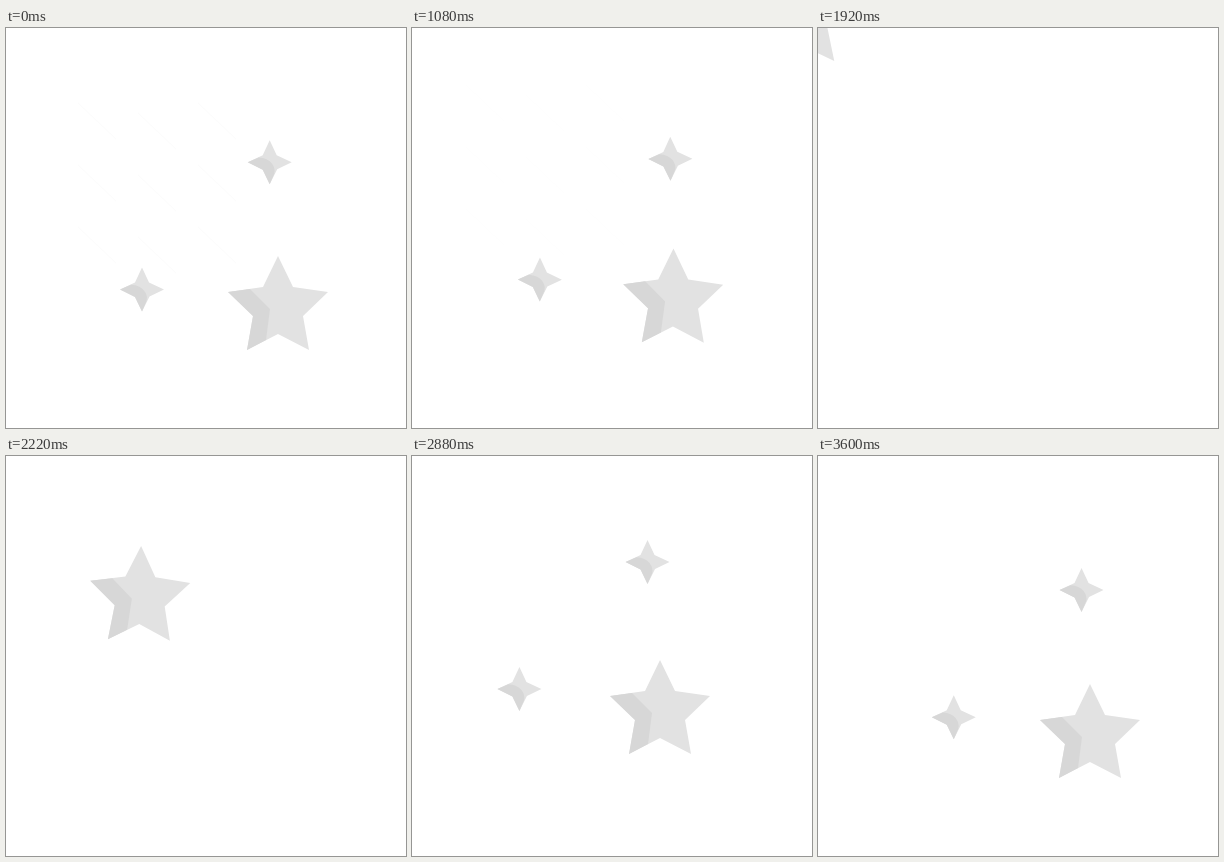
Recreate the animation shown at these times as an HTML page. Size 400x400 px, loop 5630 ms.

```html
<!DOCTYPE html>
<html lang="en">
<head>
<meta charset="utf-8">
<title>Shooting stars</title>
<style>
  html, body { margin: 0; width: 100%; height: 100%; overflow: hidden; background: #fff; }
  svg { display: block; width: 100%; height: 100%; }
  .light { fill: #e2e2e2; }
  .shade { fill: #d7d7d7; }
  #streaks { stroke: #fcfcfc; stroke-width: 1; }
</style>
</head>
<body>
<svg viewBox="0 0 400 400">
  <defs>
    <g id="spark">
      <path class="light" d="M0-22 7-7 22 0 7.5 7 0 22-7 7.5-22 0-7-7Z"/>
      <path class="shade" d="M-22 0-11-4.7Q-2-4 2 1T4.500 11.500L0 22-7 7.500Z"/>
    </g>
  </defs>
  <g id="streaks"></g>
  <g id="big">
    <path class="light" d="M0-49 15-18 50-13 25 11 31 45 0 29-31 45-25 11-50-13-15-18Z"/>
    <path class="shade" d="M-50-13-28-16-8 4-12 35-31 45-25 11Z"/>
  </g>
  <use id="upper" href="#spark"/>
  <use id="lower" href="#spark"/>
</svg>
<script>
const LOOP = 5630, STEP = 30, CUT = 1740;
const $ = id => document.getElementById(id);
const clamp = u => Math.min(1, Math.max(0, u));
const ease = u => (u = clamp(u), u * u * (3 - 2 * u));

// pull: distance drawn back, span: time that takes, lean: push across the flight line
const stars = [
  { el: $('big'), x: 272, y: 277, delay: 0, pull: 9.2, span: 900, lean: 1.7, turn: 1 },
  { el: $('upper'), x: 263.7, y: 134.2, delay: 55, pull: 6.7, span: 1800, lean: 1, turn: -0.9 },
  { el: $('lower'), x: 136, y: 261.5, delay: 60, pull: 10.4, span: 1400, lean: -0.9, turn: 0.6 }
];

// Draw back and shoot off to the lower right, then glide in from the upper left
const leave = (star, t) =>
  (Math.max(0, t - star.delay - 1134) / 197) ** 5 - star.pull * ease(t / star.span);
const enter = (star, t) =>
  Math.min(0, 6 - 294 * Math.exp((1920 + star.delay - t) / 420.5));

const sway = t => 1.9 * Math.sin(2 * Math.PI * t / 1045) * (1 - ease((t - 2220) / 660));

for (let i = 0; i < 9; i++) {
  const col = i % 3, row = Math.floor(i / 3);
  $('streaks').innerHTML +=
    `<path d="M${72 + 60 * col} ${75 + 62 * row + 10 * (col % 2)}l38 36"/>`;
}

function draw(now) {
  const t = Math.floor(now % LOOP / STEP) * STEP;
  const leaving = t < CUT;
  for (const star of stars) {
    const d = leaving ? leave(star, t) : enter(star, t);
    const side = leaving ? star.lean * ease(t / 1150) : 0;
    star.el.setAttribute('transform',
      `translate(${star.x + d - side} ${star.y + d + side}) rotate(${star.turn * sway(t)})`);
  }
  $('streaks').setAttribute('transform', `translate(${-t / 60} ${-t / 60})`);
  $('streaks').setAttribute('opacity', clamp((1200 - t) / 400));
}

const start = performance.now();
function tick() {
  draw(performance.now() - start);
  requestAnimationFrame(tick);
}
tick();
</script>
</body>
</html>
```
